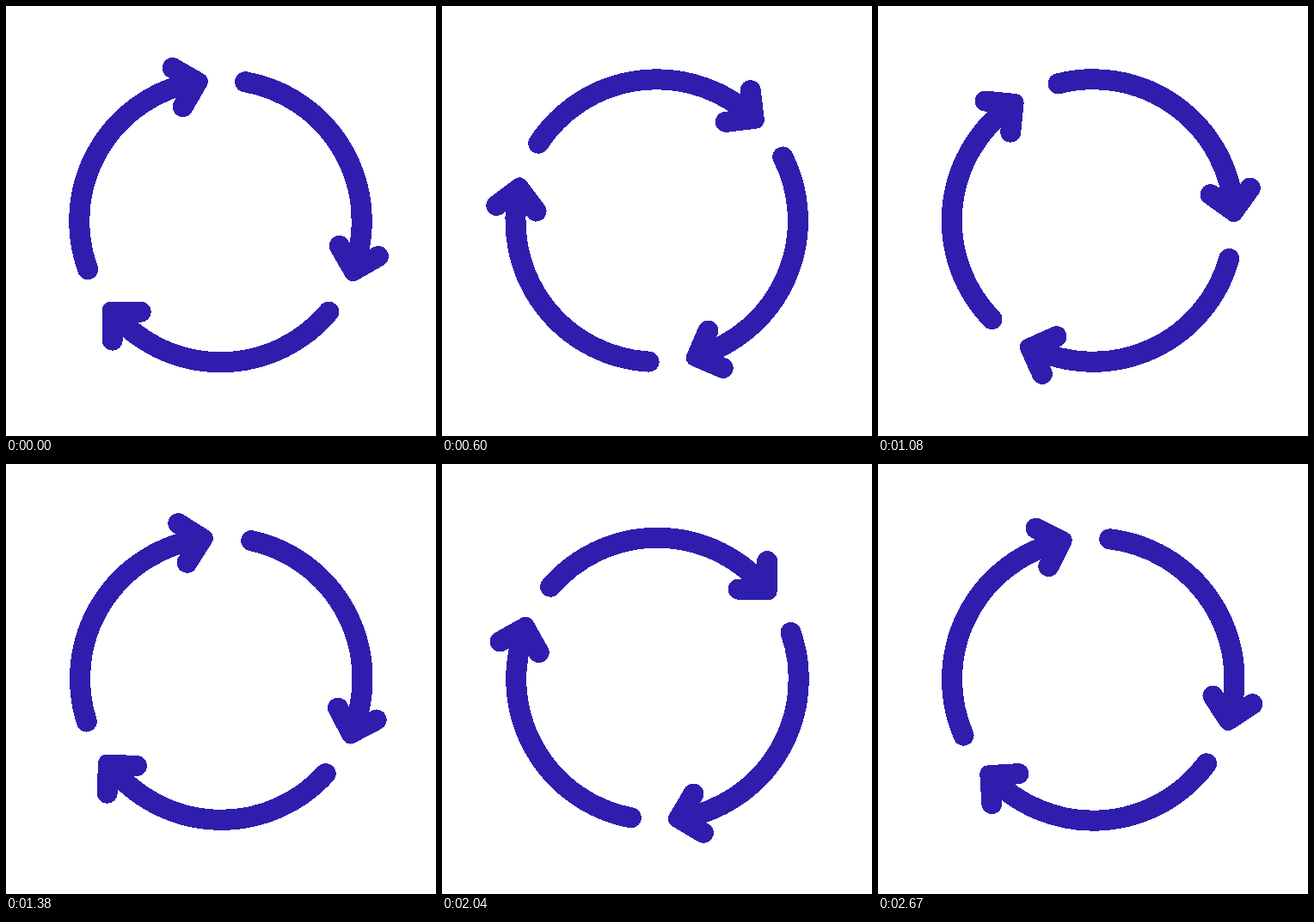
Animation, 500 px wide and 500 px high, one loop 2.7 s. Source, as an HTML page:

```html
<!DOCTYPE html>
<html lang="en">
<head>
<meta charset="utf-8">
<title>Rotating arrows</title>
<style>
  html, body { margin: 0; width: 100%; height: 100%; overflow: hidden; background: #fff; }
  svg { display: block; width: 100%; height: 100%; }
  path { fill: none; stroke: #2f1eae; stroke-width: 24; stroke-linecap: round; stroke-linejoin: round; }
  rect { fill: #2f1eae; }
</style>
</head>
<body>
<svg viewBox="0 0 500 500" shape-rendering="crispEdges">
  <defs>
    <path id="arc" d="M125.8 105.6A164.25 164.25 0 0 1 -125.8 105.6"/>
    <g id="head">
      <path d="M-92.8 105.6h-33v33"/>
      <rect x="-137.8" y="93.6" width="24" height="24" rx="10"/>
    </g>
  </defs>
  <g id="ring">
    <use href="#arc"/>
    <use href="#arc" transform="rotate(120)"/>
    <use href="#arc" transform="rotate(240)"/>
    <!-- Two heads sit slightly ahead of their arcs. -->
    <use href="#head"/>
    <use href="#head" transform="translate(1.3 .2) rotate(120)"/>
    <use href="#head" transform="translate(.4 1.4) rotate(240)"/>
  </g>
</svg>
<script>
  const LOOP = 2700, STEP = 30;
  const TURN = 240 / (65 / 24 * 1000); // degrees per ms
  const ring = document.getElementById('ring');

  function draw() {
    const time = Math.floor(performance.now() % LOOP / STEP) * STEP;
    // The ring sits half a pixel off its pivot.
    ring.setAttribute('transform', `translate(250 250) rotate(${time * TURN}) translate(-.5 0)`);
    requestAnimationFrame(draw);
  }
  draw();
</script>
</body>
</html>
```
